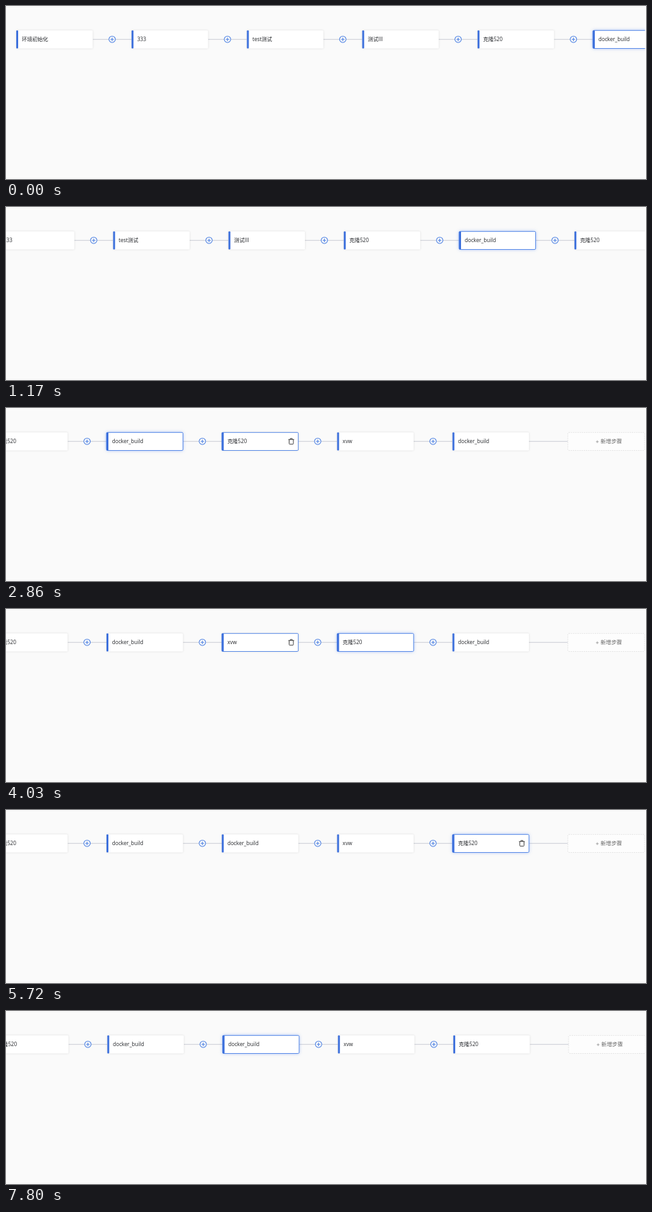
Animation, 1000 px wide and 271 px high, one loop 8 s. Source, as an HTML page:

```html
<!DOCTYPE html>
<html lang="zh-CN">
<head>
<meta charset="utf-8">
<title>Pipeline steps</title>
<style>
  html, body { margin: 0; width: 100%; height: 100%; overflow: hidden; background: #fff; }
  svg { display: block; width: 1000px; height: 271px; }
  text {
    font: 8.2px "Open Sans", "Noto Sans CJK SC", "Noto Sans CJK", sans-serif;
    fill: #26282c; white-space: pre;
  }
  .link { stroke: #c6c9d2; stroke-width: 1.1; }
  .plus { fill: #fafafa; stroke: #4a7fe3; stroke-width: 1.1; }
  .box { fill: #fff; stroke: none; filter: drop-shadow(0 .7px 1.6px rgba(0, 0, 0, .13)); }
  .bar { fill: #3d70dc; }
  .edge { fill: none; stroke: #5185e6; stroke-width: 1; visibility: hidden; }
  .bin { fill: none; stroke: #3a3a3a; stroke-width: 1; visibility: hidden; }
  .sel .box { filter: drop-shadow(0 .5px 2.6px rgba(60, 115, 235, .5)); }
  .sel .edge, .hover .edge, .hover .bin { visibility: visible; }
  .add rect { fill: #fdfdfd; stroke: #dcdcdc; stroke-width: .8; stroke-dasharray: 2 1.4; }
  .add text { fill: #666; font-size: 8.4px; }
  .add path { stroke: #909090; stroke-width: .8; }
</style>
</head>
<body>
<svg viewBox="0 0 1000 271">
  <defs><clipPath id="view"><rect width="998.5" height="271"/></clipPath></defs>
  <rect x="0.5" y="1" width="998" height="269" fill="#fafafa"/>
  <path d="M0 1.5H998.5M0 269.5H998.5" stroke="#f4f4f4"/>
  <g clip-path="url(#view)"><g id="track"></g></g>
</svg>
<script>
const LOOP = 8000, TICK = 130, PITCH = 180.2, LEFT = 16, WIDTH = 119.5, TOP = 38.3, HEIGHT = 28.2, MID = 52.2;
const DOCKER = 'docker_build', CLONE = '克隆520', USER = 'xvw';
const HEAD = ['环境初始化', '333', 'test测试', '测试III', CLONE, DOCKER];
const track = document.getElementById('track');

// Scroll runs: start, steps, from, to
const scrolls = [
  [780, 4, 0, 209],
  [1560, 3, 209, 467.5],
  [2210, 2, 467.5, 760],
  [7800, 1, 760, 758.7]
];

// Each entry changes part of the state; -1 means no card
const events = [
  [0, { tail: [CLONE, USER, DOCKER], sel: 5, hover: -1 }],
  [2860, { hover: 6 }],
  [3250, { sel: 6 }],
  [3770, { hover: -1 }],
  [4030, { tail: [USER, CLONE, DOCKER], sel: 7, hover: 6 }],
  [4160, { tail: [USER, DOCKER, CLONE], sel: 8 }],
  [4290, { hover: -1 }],
  [4550, { hover: 6 }],
  [5070, { tail: [DOCKER, USER, CLONE], hover: -1 }],
  [5720, { hover: 8 }],
  [6890, { hover: -1 }],
  [7020, { hover: 7 }],
  [7150, { hover: 6 }],
  [7280, { sel: 6, hover: -1 }]
];

function make(tag, attrs, parent) {
  const el = document.createElementNS('http://www.w3.org/2000/svg', tag);
  for (const key in attrs) el.setAttribute(key, attrs[key]);
  parent.appendChild(el);
  return el;
}

function makeLink(x, withPlus) {
  const start = x + WIDTH, mid = x + (WIDTH + PITCH) / 2;
  make('path', { class: 'link', d: `M${start} ${MID}H${x + PITCH}` }, track);
  if (!withPlus) return;
  make('circle', { class: 'plus', cx: mid, cy: MID, r: 5 }, track);
  make('path', { class: 'plus', d: `M${mid - 2.7} ${MID}h5.4M${mid} ${MID - 2.7}v5.4` }, track);
}

function makeCard(i) {
  const x = LEFT + i * PITCH;
  makeLink(x, i < 8);
  const g = make('g', {}, track);
  const size = { x, y: TOP, width: WIDTH, height: HEIGHT, rx: 1.5 };
  make('rect', { class: 'box', ...size }, g);
  make('rect', { class: 'edge', ...size }, g);
  make('rect', { class: 'bar', x, y: TOP, width: 3, height: HEIGHT, rx: 1 }, g);
  make('path', {
    class: 'bin',
    d: `M${x + 104} 49.3h9M${x + 107} 49v-1.2h3V49M${x + 105.2} 49.5v6.2q0 1 1 1h4.6q1 0 1-1v-6.2`
  }, g);
  const label = make('text', { x: x + 8.7, y: 55.3 }, g);
  return { g, label };
}

const cards = Array.from({ length: 9 }, (_, i) => makeCard(i));

const addX = LEFT + 9 * PITCH;
const add = make('g', { class: 'add' }, track);
make('rect', { x: addX, y: TOP, width: WIDTH + .5, height: HEIGHT, rx: 1.5 }, add);
make('path', { d: `M${addX + 44} 52.8h4.2M${addX + 46.1} 50.7v4.2` }, add);
make('text', { x: addX + 51.2, y: 55.4 }, add).textContent = '新增步骤';

function scrollAt(t) {
  let x = 0;
  for (const [start, steps, from, to] of scrolls) {
    if (t < start) break;
    const done = Math.min(steps, Math.floor((t - start) / TICK) + 1);
    x = from + (to - from) * done / steps;
  }
  return x;
}

function draw(t) {
  const state = {};
  for (const [start, change] of events) if (t >= start) Object.assign(state, change);
  const names = HEAD.concat(state.tail);
  cards.forEach(({ g, label }, i) => {
    if (label.textContent !== names[i]) label.textContent = names[i];
    g.setAttribute('class', (i === state.sel ? 'sel ' : '') + (i === state.hover ? 'hover' : ''));
  });
  track.setAttribute('transform', `translate(${-scrollAt(t)} 0)`);
}

const begin = performance.now();
function loop() {
  draw((performance.now() - begin) % LOOP);
  requestAnimationFrame(loop);
}
loop();
</script>
</body>
</html>
```
